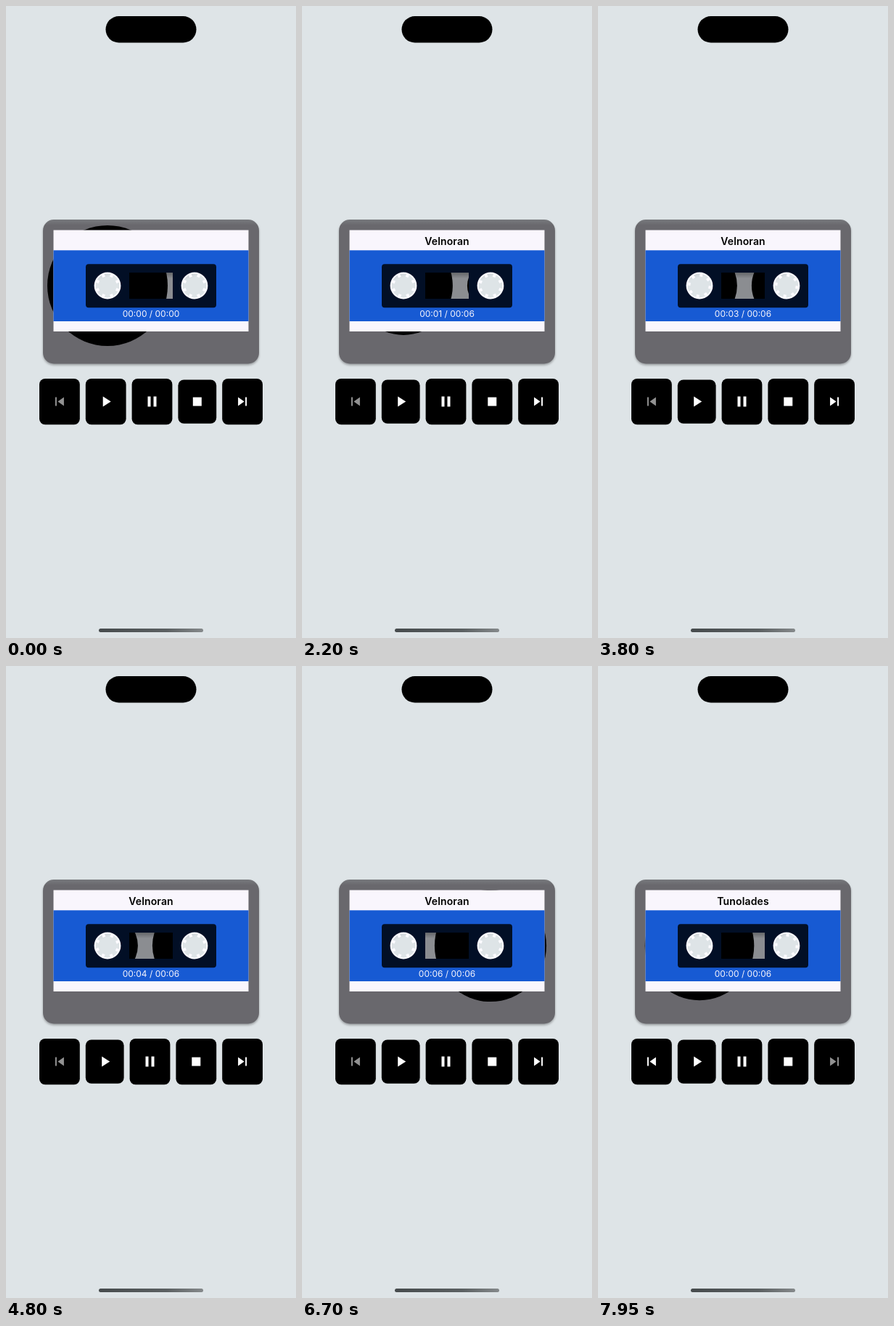
Write an HTML page that moves like this. It is 400 by 870 pixels and loops after 8000 ms.

```html
<!DOCTYPE html>
<html lang="en">
<head>
<meta charset="utf-8">
<title>Cassette player</title>
<style>
  html, body { margin: 0; width: 100%; height: 100%; overflow: hidden; background: #dee4e7; }
  svg { display: block; width: 100%; height: 100%; }
  text { font-family: Inter, sans-serif; text-anchor: middle; }
  #title { font-size: 14px; font-weight: 600; letter-spacing: .15px; }
  #time { font-size: 12px; fill: #f7f5fc; }
  #body { filter: drop-shadow(0 2px 1.5px rgba(0, 0, 0, .3)); }
</style>
</head>
<body>
<svg viewBox="0 0 400 870">
  <defs>
    <linearGradient id="bodyFill" x2="0" y2="1">
      <stop stop-color="#77797d"/><stop offset=".04" stop-color="#69686d"/>
      <stop offset="1" stop-color="#69686d"/>
    </linearGradient>
    <linearGradient id="holeShade" x2="0" y2="1">
      <stop stop-opacity=".28"/><stop offset=".22" stop-opacity="0"/>
    </linearGradient>
    <linearGradient id="hubFill" x2=".35" y2="1">
      <stop stop-color="#c3c6cb"/><stop offset=".3" stop-color="#dee4e7"/>
    </linearGradient>
    <linearGradient id="homeFill">
      <stop stop-color="#464b4d"/><stop offset=".65" stop-color="#5b6062"/>
      <stop offset="1" stop-color="#85898b"/>
    </linearGradient>
    <clipPath id="holeClip"><rect x="170" y="367" width="60" height="36"/></clipPath>
  </defs>

  <rect x="137.5" y="14" width="125" height="36.5" rx="18.25"/>

  <rect id="body" x="51" y="294" width="298" height="198.5" rx="15" fill="url(#bodyFill)"/>
  <circle class="supply" cx="140" cy="385"/>
  <circle class="takeup" cx="260" cy="385"/>

  <rect x="65.5" y="308.5" width="269" height="139.5" fill="#f9f6fd"/>
  <rect x="65.5" y="336.3" width="269" height="97.7" fill="#175ad3"/>
  <rect x="110" y="355.3" width="180" height="60" rx="4" fill="#020f26"/>

  <g clip-path="url(#holeClip)">
    <rect x="170" y="367" width="60" height="36" fill="#8b8d91"/>
    <rect x="170" y="367" width="60" height="36" fill="url(#holeShade)"/>
    <circle class="supply" cx="140" cy="385"/>
    <circle class="takeup" cx="260" cy="385"/>
  </g>

  <g id="hubs"></g>
  <text id="title" x="200" y="328.5"></text>
  <text id="time" x="200" y="428.4"></text>
  <g id="buttons"></g>

  <rect x="128" y="857" width="144" height="5" rx="2.5" fill="url(#homeFill)"/>
</svg>

<script>
const LOOP = 8000, PRESS = 500, LOADED = 600, PLAY = 690, NEXT = 7180;
const FULL_RADIUS = 83, EMPTY_RADIUS = 17, TAPE_SPEED = 0.01;
const TEETH = 8, SPIN = 0.12;
const ROW_LEFT = 46, ROW_MIDDLE = 544.6, GAP = 8;
const ICONS = [
  'M6 6h2v12H6zM9.5 12l8.5 6V6z',
  'M8 5v14l11-7z',
  'M6 5h4v14H6zM14 5h4v14h-4z',
  'M6 6h12v12H6z',
  'M6 18l8.5-6L6 6zM16 6h2v12h-2z'
];

const byId = id => document.getElementById(id);
const clamp = v => Math.min(1, Math.max(0, v));
const ease = v => v * v * (3 - 2 * v);

function add(parent, tag, attrs = {}) {
  const node = document.createElementNS('http://www.w3.org/2000/svg', tag);
  set(node, attrs);
  parent.append(node);
  return node;
}

function set(node, attrs) {
  for (const name in attrs) node.setAttribute(name, attrs[name]);
}

const hubs = [140, 260].map(x => {
  const hub = add(byId('hubs'), 'g', { transform: `translate(${x} 385)` });
  add(hub, 'circle', { r: 18.4, fill: '#fcfbff' });
  add(hub, 'circle', { r: 16.4, fill: 'url(#hubFill)' });
  const teeth = add(hub, 'g');
  for (let i = 0; i < TEETH; i++) {
    add(teeth, 'rect', {
      x: -2, y: -17.2, width: 4, height: 4.6, fill: '#fcfbff',
      transform: `rotate(${(i + 0.5) * 360 / TEETH})`
    });
  }
  return teeth;
});

const buttons = ICONS.map(d => ({
  key: add(byId('buttons'), 'rect', { rx: 8 }),
  icon: add(byId('buttons'), 'path', { d })
}));

function drawButtons(t) {
  const play = ease(clamp((t - PRESS) / 250));
  const pressed = [0, play, 0, 1 - play, 0];
  const dimmed = t < NEXT ? 0 : 4;
  let x = ROW_LEFT;
  buttons.forEach(({ key, icon }, i) => {
    const width = 55.8 - 3 * pressed[i];
    const height = 63.4 - 3 * pressed[i];
    set(key, { x, y: ROW_MIDDLE - height / 2, width, height });
    set(icon, {
      transform: `translate(${x + width / 2 - 12} ${ROW_MIDDLE - 12})`,
      fill: i === dimmed ? '#929292' : '#fff'
    });
    x += width + GAP;
  });
}

function draw(t) {
  const played = t < NEXT ? Math.max(0, t - PLAY) : t - NEXT;
  const wound = played * TAPE_SPEED;
  document.querySelectorAll('.supply').forEach(c => set(c, { r: FULL_RADIUS - wound }));
  document.querySelectorAll('.takeup').forEach(c => set(c, { r: EMPTY_RADIUS + wound }));

  const angle = -Math.max(0, t - PLAY) * SPIN;
  hubs.forEach(teeth => set(teeth, { transform: `rotate(${angle})` }));

  const loaded = t >= LOADED;
  byId('title').textContent = !loaded ? '' : t < NEXT ? 'Velnoran' : 'Tunolades';
  byId('time').textContent = `00:0${Math.floor(played / 1000)} / 00:0${loaded ? 6 : 0}`;
  drawButtons(t);
}

const start = performance.now();
function tick() {
  draw((performance.now() - start) % LOOP);
  requestAnimationFrame(tick);
}
tick();
</script>
</body>
</html>
```
